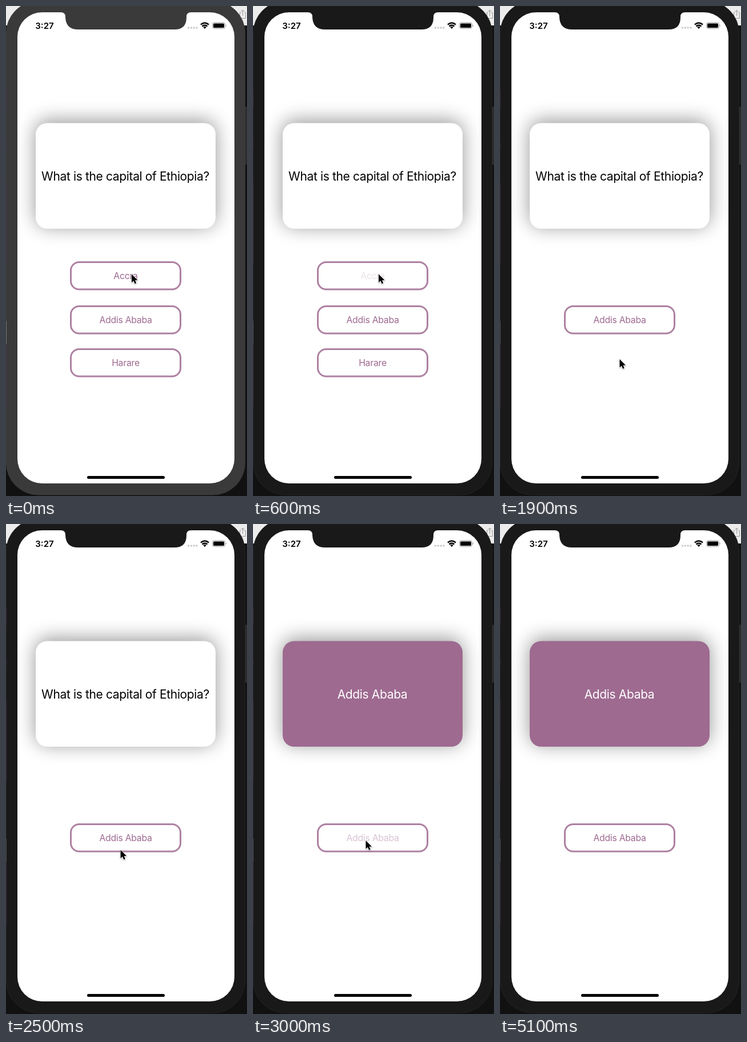
These frames come from a looping animation (422 px wide and 856 px high, 5.3 s). An HTML page:

```html
<!DOCTYPE html>
<html lang="en">
<head>
<meta charset="utf-8">
<title>Capital quiz</title>
<style>
  html, body { margin: 0; width: 100%; height: 100%; overflow: hidden; background: #111; }
  svg { display: block; width: 422px; height: 856px; }
  text { font-family: Inter, sans-serif; text-anchor: middle; letter-spacing: -.017em; }
  .choice rect { fill: #fff; stroke: #ae80a2; stroke-width: 3; }
  .choice text { font-size: 15.8px; fill: #9e6a90; }
  #label { font-size: 21px; }
</style>
</head>
<body>
<svg viewBox="0 0 422 856">
  <defs>
    <filter id="soft" x="-30%" y="-40%" width="160%" height="180%"><feGaussianBlur stdDeviation="17"/></filter>
    <filter id="drop" x="-50%" y="-50%" width="200%" height="200%">
      <feDropShadow dx="0" dy="1" stdDeviation="1" flood-opacity=".4"/>
    </filter>
  </defs>

  <!-- desktop behind the phone -->
  <rect width="422" height="856" fill="#111"/>
  <rect width="422" height="34" fill="#ececec"/>
  <path d="M411.500 11.500H409.500V21.500H419.500V11.500H417.500M414.500 17V7M411.500 10L414.500 7L417.500 10" fill="none" stroke="#999"/>
  <rect x="417" y="176" width="5" height="101" fill="#2c2c2c"/>

  <!-- phone -->
  <rect id="bezel" x=".5" y="-8.500" width="418" height="862.500" rx="56"/>
  <g id="edge">
    <path d="M.5 147V177M.5 238V246M.5 308V450M.5 590V701" stroke="#4b3156"/>
    <path d="M.5 550V590" stroke="#777"/>
  </g>
  <rect x="20" y="11" width="380" height="823" rx="43" fill="#fff"/>
  <path id="notch" d="M96 10.500V11Q104 11 104 19V20Q105 41 126 41H295Q316 41 316 20V19Q316 11 324 11V10.500Z"/>
  <text x="67.500" y="40" font-size="15" font-weight="600" style="letter-spacing:0">3:27</text>
  <path d="M319.500 38h.01M324.300 38h.01M329.100 38h.01M333.900 38h.01" stroke="#c8c8c8" stroke-width="3.400" stroke-linecap="round"/>
  <g fill="none" stroke="#000" stroke-width="2.400">
    <path d="M341 32.500Q348 26.500 355 32.500"/>
    <path d="M343.500 35.500Q348 31.500 352.500 35.500"/>
    <path d="M345.300 36.900Q348 34.800 350.700 36.900L348 40Z" fill="#000" stroke="none"/>
  </g>
  <rect x="361.500" y="29" width="22" height="10.500" rx="3" fill="none" stroke="#999"/>
  <rect x="363" y="30.500" width="19" height="7.500" rx="1.600"/>
  <path d="M384.800 32.500Q387 34.200 384.800 36Z" fill="#888"/>
  <rect x="142" y="821" width="136" height="5" rx="2.500"/>

  <!-- card -->
  <rect x="52" y="200.500" width="315" height="184.500" rx="20" opacity=".42" filter="url(#soft)"/>
  <rect id="card" x="52" y="204.500" width="315" height="184.500" rx="20"/>
  <text id="label" x="209" y="305"></text>

  <g id="choices"></g>
  <path id="cursor" d="M0 0V14.500L3.400 11.400L5.700 16.700L8.200 15.600L6 10.500H10.500Z" stroke="#fff" stroke-width="1.200" paint-order="stroke" filter="url(#drop)"/>
</svg>
<script>
const LOOP = 5300, STEP = 100;
const $ = id => document.getElementById(id);

const choices = [
  { name: 'Accra', y: 446, press: 500, hide: 700 },
  { name: 'Addis Ababa', y: 523, press: 2800, release: 2900 },
  { name: 'Harare', y: 598, press: 1600, hide: 1800 }
];
$('choices').innerHTML = choices.map(({ name, y }) => `<g class="choice">
  <rect x="113.500" y="${y + 1.5}" width="192" height="47.500" rx="14.500"/>
  <text x="209.500" y="${y + 31}">${name}</text></g>`).join('');
choices.forEach((choice, i) => choice.node = $('choices').children[i]);

const clamp = v => Math.max(0, Math.min(1, v));
const smooth = p => p * p * (3 - 2 * p);
const moves = [
  { start: 900, end: 1600, to: [209.5, 617], ease: smooth },
  { start: 2100, end: 2700, to: [197.5, 553], ease: smooth },
  { start: 4300, end: 4800, to: [344, 55], ease: p => p ** 1.6 }
];

function cursorAt(t) {
  let [x, y] = [220, 468.5];
  for (const { start, end, to, ease } of moves) {
    const p = ease(clamp((t - start) / (end - start)));
    x += (to[0] - x) * p;
    y += (to[1] - y) * p;
  }
  return [x, y];
}

function textOpacity(t, { press, release = Infinity }) {
  if (t < press) return 1;
  return .2 + .8 * clamp((t - release) / 400);
}

function draw(t) {
  const active = t >= 500, answered = t >= 3000;
  $('bezel').setAttribute('fill', active ? '#191919' : '#3a3a3a');
  $('bezel').setAttribute('stroke', active ? '#242424' : '#3a3a3a');
  $('notch').setAttribute('fill', active ? '#191919' : '#3a3a3a');
  $('edge').setAttribute('opacity', active ? .5 : 1);
  $('card').setAttribute('fill', answered ? '#9e6a90' : '#fff');
  $('label').setAttribute('fill', answered ? '#fff' : '#000');
  $('label').textContent = answered ? 'Addis Ababa' : 'What is the capital of Ethiopia?';
  for (const choice of choices) {
    choice.node.style.display = t >= choice.hide ? 'none' : '';
    choice.node.lastElementChild.style.opacity = textOpacity(t, choice);
  }
  $('cursor').setAttribute('transform', `translate(${cursorAt(t)})`);
  $('cursor').style.display = t >= 4900 ? 'none' : '';
}

const began = performance.now();
function tick() {
  const t = (performance.now() - began) % LOOP;
  draw(Math.floor(t / STEP) * STEP);
  requestAnimationFrame(tick);
}
tick();
</script>
</body>
</html>
```
